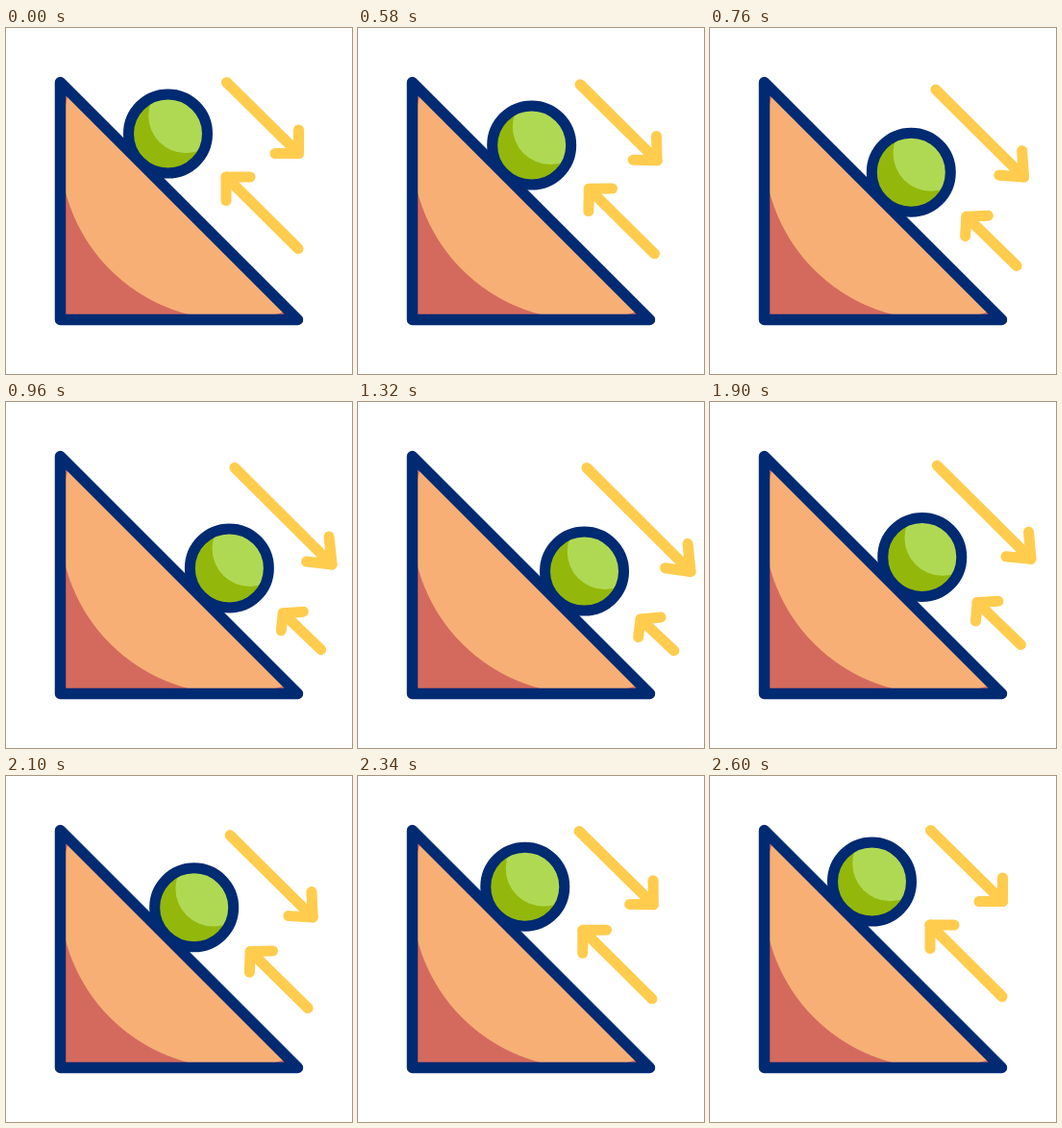
Write an HTML page with a canvas that moves like this. It is 360 px wide and 360 px high and loops after 3 s.

```html
<!DOCTYPE html>
<html lang="en">
<head>
<meta charset="utf-8">
<title>Ball on a ramp</title>
<style>
html, body { margin: 0; width: 100%; height: 100%; overflow: hidden; background: #fff; }
canvas { display: block; width: 360px; height: 360px; }
</style>
</head>
<body>
<canvas id="stage" width="360" height="360"></canvas>
<script>
const ctx = document.getElementById('stage').getContext('2d');
const LOOP = 3000;
const NAVY = '#002a72', ORANGE = '#f7af76', RED = '#d46a5d';
const GREEN = '#93b80b', LIME = '#b0d953', YELLOW = '#ffcc4d';

// Each arrow point: rest position, shift along the main slide, extra shift during the slow drift.
const downArrow = {
  tail: [229.5, 56.5, 8.5, 12, 0, 0],
  tip: [304.5, 130.5, 35, 39, 8.5, 9],
  wings: [[280, 130.5, 33, 36, 8.5, 8], [304.5, 106, 32, 34.5, 8.5, 9]]
};
const upArrow = {
  tail: [304, 229.5, 24, 28.5, 1, 1],
  tip: [229, 155, 60, 65.5, 6.5, 7],
  wings: [[254, 155, 56, 64, 6.5, 6.5], [229, 179.5, 58, 59, 6, 8]]
};

const span = (t, from, to) => Math.min(1, Math.max(0, (t - from) / (to - from)));
const smooth = u => u * u * (3 - 2 * u);
const inOut = (u, p) => u < 0.5 ? 0.5 * (2 * u) ** p : 1 - 0.5 * (2 - 2 * u) ** p;

function circle(x, y, r) {
  ctx.beginPath();
  ctx.arc(x, y, r, 0, Math.PI * 2);
}

function line(points) {
  ctx.beginPath();
  points.forEach(([x, y]) => ctx.lineTo(x, y));
}

function stroke(color, width) {
  ctx.strokeStyle = color;
  ctx.lineWidth = width;
  ctx.stroke();
}

function fill(color) {
  ctx.fillStyle = color;
  ctx.fill();
}

function drawRamp() {
  const corners = [[56.5, 56.5], [56.5, 303.5], [303.5, 303.5]];
  ctx.save();
  line(corners);
  ctx.closePath();
  ctx.clip();
  fill(RED);
  circle(235, 125, 179);
  fill(ORANGE);
  ctx.restore();
  line(corners);
  ctx.closePath();
  stroke(NAVY, 11.5);
}

function drawBall(slide, drift) {
  const d = 64.7 * slide + 3 * drift;
  ctx.save();
  ctx.translate(168.5 + d, 110 + d - slide);
  ctx.save();
  circle(0, 0, 40);
  ctx.clip();
  fill(GREEN);
  circle(19 + 2.5 * slide, -19 - 1.3 * slide, 39.3);
  fill(LIME);
  ctx.restore();
  circle(0, 0, 41);
  stroke(NAVY, 11);
  ctx.restore();
}

function drawArrow({ tail, tip, wings }, slide, drift) {
  const at = ([x, y, sx, sy, dx, dy]) =>
    [x + sx * slide + dx * drift, y + sy * slide + dy * drift];
  line([tail, tip].map(at));
  stroke(YELLOW, 11);
  line([wings[0], tip, wings[1]].map(at));
  stroke(YELLOW, 11);
}

function draw(t) {
  const slide = smooth(span(t, 420, 1000)) - inOut(span(t, 1530, 2600), 2.5);
  const drift = smooth(span(t, 940, 1490)) - smooth(span(t, 1490, 2050));
  ctx.fillStyle = '#fff';
  ctx.fillRect(0, 0, 360, 360);
  ctx.lineCap = ctx.lineJoin = 'round';
  drawRamp();
  drawBall(slide, drift);
  drawArrow(downArrow, slide, drift);
  drawArrow(upArrow, slide, drift);
}

const start = performance.now();
function frame() {
  draw((performance.now() - start) % LOOP);
  requestAnimationFrame(frame);
}
frame();
</script>
</body>
</html>
```
